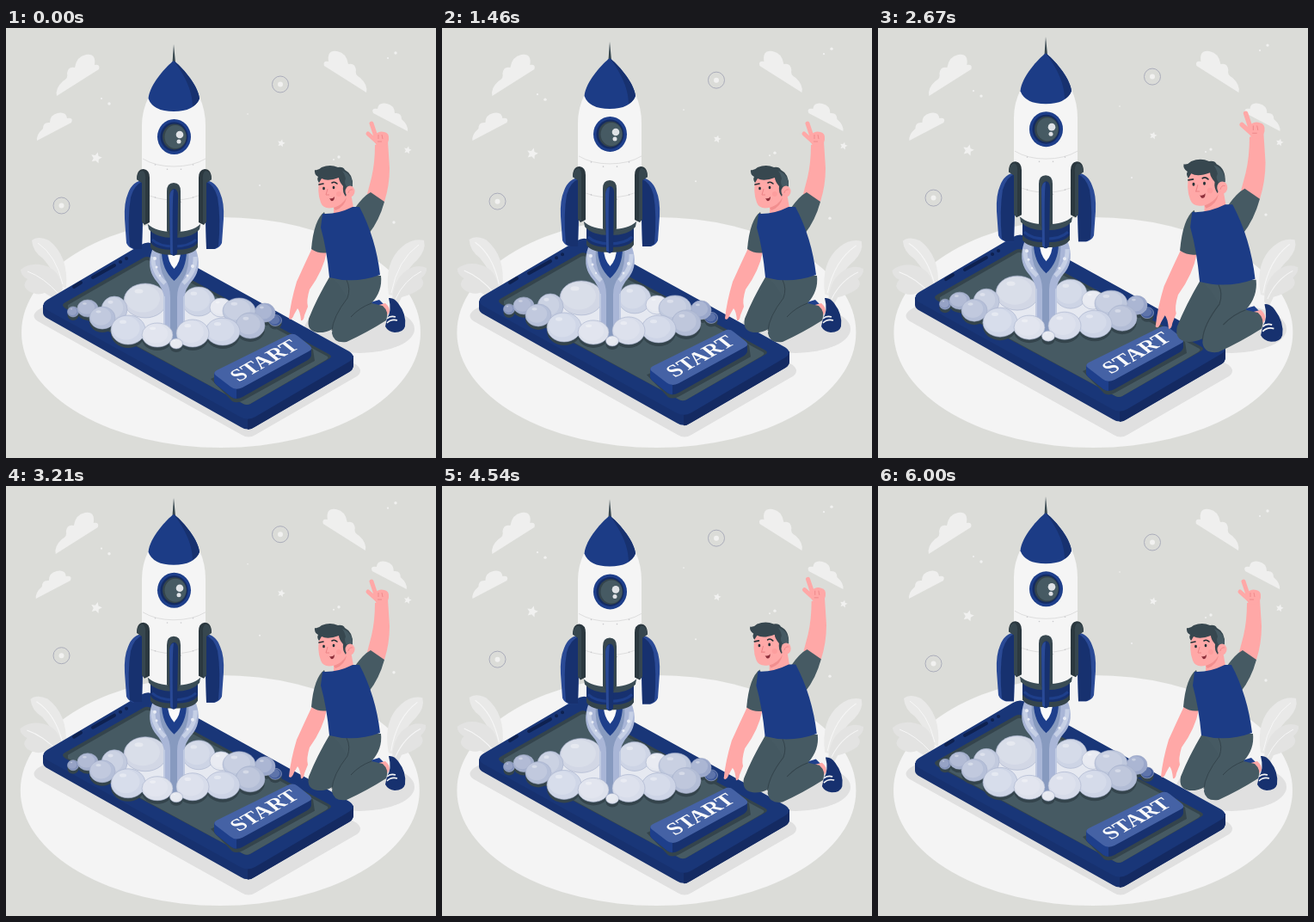
An HTML page for the animation above (6040 ms loop, 500 by 500 pixels).

```html
<!DOCTYPE html>
<html lang="en">
<head>
<meta charset="utf-8">
<title>Rocket launch</title>
<style>
  html, body { margin: 0; width: 100%; height: 100%; overflow: hidden; background: #dbdcd8; }
  svg { display: block; width: 100vw; height: 100vh; }
</style>
</head>
<body>
<svg viewBox="0 0 500 500">
  <defs>
    <path id="cloudBig" d="M59 79 L108 48 Q110 42 103 43 Q105 29 93 31 Q82 33 80 46 Q72 44 71 53 Q73 58 66 62 Q57 70 59 79Z"/>
    <path id="cloudSmall" d="M36 131 L76 110 Q79 104 71 105 Q70 97 60 99 Q51 101 51 110 Q43 109 43 117 Q35 124 36 131Z"/>
    <g id="sideFin">
      <path d="M160 177 Q147 178 142 192 Q137 203 138 222 L140 250 Q142 255 148 257 L158 257Z" fill="#2a4a96"/>
      <path d="M160 178 Q149 182 145 197 Q141 220 144 254 L149 257 L158 257Z" fill="#17316f"/>
      <path d="M152 176 Q152 164 160 164 Q167 165 167 174 V226 L161 229 L158 225 V180Z" fill="#2b383f"/>
      <path d="M152 176 Q153 166 159 166 Q163 168 162 178 V228 L158 225 V180Z" fill="#37474f"/>
    </g>
  </defs>
  <rect width="500" height="500" fill="#dbdcd8"/>

  <g id="backdrop">
    <ellipse cx="250" cy="354" rx="232" ry="134" fill="#f4f4f4"/>
    <g fill="#efefee">
      <use href="#cloudBig"/><use href="#cloudSmall"/>
      <use href="#cloudBig" transform="translate(478 -4) scale(-1 1)"/>
      <use href="#cloudSmall" transform="translate(503 -11) scale(-1 1)"/>
    </g>
  </g>

  <g id="leftPlant">
    <path d="M70 302 Q73 265 50 247 Q37 241 30 247 Q31 260 43 268 Q54 281 65 301Z" fill="#e9e9e8"/>
    <path d="M66 303 Q62 280 44 276 Q28 272 17 281 Q17 288 25 292 Q18 299 25 305 Q36 312 45 308 L58 316Z" fill="#e3e3e2"/>
    <path d="M66 298 Q58 264 37 250 M61 309 Q44 290 25 283" fill="none" stroke="#f7f7f7"/>
  </g>
  <g id="rightPlant">
    <path d="M445 310 Q439 272 461 254 Q473 244 486 247 Q489 258 478 270 Q462 284 452 312Z" fill="#e9e9e8"/>
    <path d="M449 318 Q450 292 467 281 Q479 274 489 279 Q490 285 483 291 Q488 297 482 303 Q472 310 460 313 L454 325Z" fill="#e3e3e2"/>
    <path d="M448 308 Q455 270 480 252 M453 315 Q463 293 483 283" fill="none" stroke="#f7f7f7"/>
  </g>

  <g id="sky"></g>

  <path d="M37 328 L158 258 Q165 255 172 258 L408 392 Q416 399 408 405 L290 473 Q282 478 274 473 L37 341 Q28 335 37 328Z" fill="#e0e0e0"/>
  <ellipse cx="411" cy="350" rx="64" ry="28" fill="#e0e0e0"/>

  <g id="phone">
    <path d="M43 322 V331 Q43 335 49 338 L273 464 Q281 469 289 464 L399 400 Q404 397 404 392 V381Z" fill="#17316f"/>
    <path d="M281 455 V467 Q285 467 289 464 L399 400 Q404 397 404 392 V381Z" fill="#142a62"/>
    <path d="M48 316 L157 252 Q165 247 174 252 L399 376 Q408 382 399 388 L290 452 Q281 457 272 452 L48 328 Q39 322 48 316Z" fill="#193678"/>
    <path d="M69 319 L160 267 Q164 265 168 267 L375 379 Q381 382 375 385 L284 437 Q280 439 276 437 L69 326 Q63 322 69 319Z" fill="#34444c"/>
    <path d="M72 322 L161 271 Q164 269 168 271 L372 381 Q377 383 372 386 L284 437 Q280 439 276 437 L72 326Z" fill="#465a63"/>
    <path d="M79 301 L87 296 M101 290 L126 276 M133 272 h.1 M140 268 h.1" stroke="#0e2150" stroke-width="4" stroke-linecap="round"/>
    <path d="M238 408 L263 434 Q269 437 276 433 L359 387 L357 374 L338 361Z" fill="#34444c"/>
    <path d="M242 401 V410 Q242 413 246 416 L262 429 Q268 433 275 429 L351 386 Q355 383 355 380 V372Z" fill="#17316f"/>
    <path d="M242 401 V410 Q242 413 246 416 L262 429 Q265 431 268 431 V420Z" fill="#1e3f8b"/>
    <path d="M245 398 L328 357 Q334 354 339 358 L353 369 Q358 373 352 376 L275 418 Q267 422 261 417 L244 404 Q240 401 245 398Z" fill="#4562a5"/>
    <text transform="matrix(.87 -.49 .75 .6 306.500 391.500)" text-anchor="middle" font-family="'Liberation Serif', serif" font-weight="bold" font-size="25.5" fill="#fafafa">START</text>
  </g>

  <g id="rocket">
    <g id="smokeShade" fill="#34444c"></g>
    <ellipse cx="197" cy="340" rx="72" ry="25" fill="#e6e9f1"/>
    <g id="smokeBack"></g>
    <path d="M170 258 Q163 278 173 292 Q184 304 184 316 V364 H207 V316 Q207 304 218 292 Q228 278 221 258Z" fill="#a9b6d7"/>
    <path d="M179 258 Q177 279 185 292 Q191 301 191 313 V364 H199 V313 Q199 301 206 292 Q214 279 212 258Z" fill="#879abf"/>
    <path d="M171 266 Q170 283 185 297 M220 266 Q221 283 206 297" fill="none" stroke="#c6d0e6" stroke-width="5"/>
    <path d="M184 312 V364 M207 312 V364" stroke="#c0cae2" stroke-width="2"/>
    <g fill="#e9edf6">
      <circle cx="173" cy="268" r="2"/><circle cx="175" cy="278" r="1.5"/><circle cx="217" cy="277" r="2"/><circle cx="211" cy="288" r="1.5"/><circle cx="179" cy="288" r="1.2"/>
    </g>
    <path d="M181 259 H210 Q210 281 195.500 294 Q181 281 181 259Z" fill="#1e3f8b"/>
    <path d="M188 259 H203 Q203 272 195.500 280 Q188 272 188 259Z" fill="#fafafa"/>
    <g id="smokeFront"></g>

    <path d="M168 235 H223 V255 Q218 264 195.500 264 Q173 264 168 255Z" fill="#34444c"/>
    <path d="M168 235 H223 V249 Q218 258 195.500 258 Q173 258 168 249Z" fill="#17316f"/>
    <path d="M170 246 Q178 254 195 254 Q213 254 221 246" fill="none" stroke="#1e3f8b" stroke-width="3"/>
    <path d="M164 223 H227 L225 234 Q217 244 195.500 244 Q174 244 166 234Z" fill="#3b4d56"/>
    <path d="M166 80 Q158 96 158 113 V175 Q159 210 165 228 Q174 237 195.500 237 Q217 237 226 228 Q232 210 232 175 V113 Q232 96 225 80Z" fill="#f5f5f5"/>
    <path d="M159 152 Q174 161 195 161 Q217 161 232 152 M159 191 Q174 200 195 200 Q217 200 231 191" fill="none" stroke="#dedede"/>
    <g id="rivets" fill="#c9c9cc"></g>
    <path d="M195 19 L197 40 H193.500Z" fill="#37474f"/>
    <path d="M195 38 C203 44 223 65 225 82 Q219 97 195 97 Q171 97 165.500 82 C167 65 187 44 195 38Z" fill="#1c3c86"/>
    <path d="M195 38 C203 44 223 65 225 82 Q223 88 217 91 C217 72 206 52 195 38Z" fill="#17316f"/>
    <ellipse cx="195.500" cy="126.500" rx="19.500" ry="20.500" fill="#1e3f8b"/>
    <ellipse cx="195.500" cy="126.500" rx="16" ry="17" fill="#142b62"/>
    <ellipse cx="196" cy="126.500" rx="14" ry="15" fill="#34444c"/>
    <ellipse cx="197" cy="126.500" rx="12.500" ry="13.500" fill="#465a63"/>
    <circle cx="202" cy="124" r="4.300" fill="#dfe2e6"/><circle cx="201" cy="132" r="2.500" fill="#dfe2e6"/>
    <use href="#sideFin"/><use href="#sideFin" transform="translate(391 0) scale(-1 1)"/>
    <path d="M187 190 Q187 180 195 180 Q203 180 203 190 V236 L199 243 H192 L187 236Z" fill="#37474f"/>
    <path d="M190 196 Q191 187 196 187 Q201 188 200 200 L199 262 Q195 268 191 262Z" fill="#17316f"/>
    <path d="M190 196 Q191 188 195 188 Q193 200 194 264 L191 262Z" fill="#2a4a96"/>
  </g>

  <g id="person">
    <path d="M424 319 L434 316 L441 323 L439 330 L428 326Z" fill="#1e3f8b"/>
    <path d="M430 323 L441 320 Q446 324 446 330 L441 337Z" fill="#ffa8a7"/>
    <path d="M445 314 Q451 313 456 320 Q466 333 464 347 Q462 354 452 354 Q444 353 441 347 L443 338 Q449 329 445 314Z" fill="#17316f"/>
    <path d="M443 338 Q447 334 453 336 M443 343 Q448 338 455 340" fill="none" stroke="#f5f5f5" stroke-width="1.600"/>
    <path d="M377 288 Q361 315 352 338 Q349 352 362 354 Q380 355 386 342 L414 300Z" fill="#445861"/>
    <path d="M377 288 L436 288 Q438 306 425 320 L438 323 Q446 330 442 340 Q420 354 396 365 Q381 367 379 355 Q380 336 397 314 L388 300Z" fill="#465a63"/>
    <path d="M425 320 Q411 325 401 336 M379 352 Q380 336 397 314 Q401 303 396 293" fill="none" stroke="#34444c"/>

    <path d="M429 136 Q429 157 425 174 L420 193 L440 202 Q446 183 446 163 Q445 147 444 132Z" fill="#ffa8a7"/>
    <path d="M425 111 L430 126 M421 123 L431 132" stroke="#ffa8a7" stroke-width="5" stroke-linecap="round"/>
    <path d="M429 124 Q434 119 440 121 Q446 122 445 130 Q444 137 436 138 Q429 137 428 130Z" fill="#ffa8a7"/>
    <path d="M433 124 V129 M437 124 L438 129 M432 132 L437 132" fill="none" stroke="#eb8386" stroke-width=".8"/>
    <path d="M406 209 Q416 195 424 191 L440 202 Q434 224 422 239 Q414 233 408 221Z" fill="#465a63"/>

    <path d="M356 256 Q347 275 338 295 Q331 318 329 338 Q332 341 335 333 L339 326 Q342 329 343 340 Q346 341 347 334 L351 324 Q349 317 353 304 Q369 282 373 260Z" fill="#ffa8a7"/>
    <path d="M370 214 Q358 223 355 257 Q364 263 374 261 L377 232Z" fill="#445861"/>
    <path d="M381 205 L401 192 L404 209 Q393 218 381 216Z" fill="#ffa8a7"/>
    <path d="M368 216 Q385 217 403 208 L411 208 Q430 244 435 287 Q405 298 376 290 Q373 257 366 232Z" fill="#1c3c86"/>

    <path d="M365 174 Q361 190 366 203 Q369 211 380 209 Q391 206 397 196 L399 183 L395 172 Q380 166 365 174Z" fill="#ffa8a7"/>
    <path d="M381 209 Q391 206 396 197 Q394 208 383 212Z" fill="#f28f8f"/>
    <path d="M364 180 Q361 176 363 173 Q358 170 359 165 Q363 166 367 162 Q377 158 386 162 Q392 161 394 165 Q404 170 403 184 L398 187 L395 196 Q391 191 392 184 Q387 178 387 174 Q374 179 367 175Z" fill="#37474f"/>
    <path d="M391 166 Q403 170 403 184 L398 187 Q392 181 395 175 Q394 170 391 166Z" fill="#465a63"/>
    <ellipse cx="400" cy="190" rx="5.500" ry="6.500" fill="#ffa8a7"/>
    <path d="M398 192 Q399 187 403 188" fill="none" stroke="#eb8386" stroke-width=".8"/>
    <g fill="none" stroke="#263238" stroke-linecap="round">
      <path d="M364 182 L369 181 M379 180 Q382 178 385 181" stroke-width="1.600"/>
      <path d="M369.500 186 v1 M381 185 v1" stroke-width="2.600"/>
    </g>
    <path d="M374 187 L372 194 L376 194" fill="none" stroke="#eb8386"/>
    <path d="M376 198 Q380 199 382 196 Q382 202 378 201Z" fill="#8c2f3b"/>
    <circle cx="387" cy="193" r="3" fill="#f78f92" opacity=".4"/>
  </g>
</svg>
<script>
const LOOP = 6040;
const byId = id => document.getElementById(id);
const fill = (id, markup) => { byId(id).innerHTML = markup; };
const dot = (x, y, r) => `<circle cx="${x}" cy="${y}" r="${r}"/>`;

function star(cx, cy, r) {
  const points = Array.from({ length: 10 }, (_, i) => {
    const a = -Math.PI / 2 + 0.25 + i * Math.PI / 5, d = i % 2 ? r * 0.48 : r;
    return `${cx + d * Math.cos(a)},${cy + d * Math.sin(a)}`;
  });
  return `<polygon points="${points.join(' ')}"/>`;
}
const ring = (x, y) =>
  `<circle cx="${x}" cy="${y}" r="9.5" fill="none" stroke="#a5a7b7" stroke-width=".9"/>` + dot(x, y, 3);

fill('sky', '<g fill="#f1f1f0">' + ring(319, 65.5) + ring(64.5, 206.5) +
  star(105, 151, 6.8) + star(320, 134, 4.6) + star(467, 142, 4.6) +
  [[120, 88, 1.7], [111, 82, 1.1], [453, 29, 1.7], [444, 35, 1.1], [387, 150, 1.7], [381, 153, 1],
   [281, 100, .8], [295, 183, 1], [451, 226, 1.7]].map(p => dot(...p)).join('') + '</g>');

// Puffs: x, y, rx, ry, colour
const backPuffs = [
  [78, 330, 6.5, 6, '#8291ba'], [95, 326, 12, 10, '#a4afcd'], [162, 317, 25, 20, '#d2d7e5'],
  [126, 327, 15, 15, '#c2cade'], [112, 337, 15, 13, '#b5bfd8'],
  [224, 318, 19, 17, '#cdd4e5'], [250, 325, 13, 11, '#e5e8f0'],
  [313, 340, 7.5, 6.5, '#405a9a'], [301, 331, 12, 11, '#9ba8cb'], [271, 329, 19, 15, '#bfc8dd']
];
const frontPuffs = [
  [142, 351, 20, 17, '#cfd6e7'], [284, 346, 17, 15, '#b3bdd6'], [252, 353, 20, 16, '#cdd4e6'],
  [176, 357, 18, 14, '#dde1ec'], [217, 355, 19, 16, '#d7dcea'], [198, 367, 7.5, 6, '#e3e6ef']
];
const puff = ([x, y, rx, ry, color]) => `
  <ellipse cx="${x}" cy="${y}" rx="${rx}" ry="${ry}" fill="${color}" stroke="#a7b1cc" stroke-width=".6"/>
  <ellipse cx="${x - rx * .12}" cy="${y - ry * .12}" rx="${rx * .8}" ry="${ry * .8}" fill="#fff" opacity=".16"/>
  <ellipse cx="${x - rx * .3}" cy="${y - ry * .55}" rx="${rx * .2}" ry="${ry * .13}" fill="#fff" opacity=".35"/>`;
const shade = ([x, y, rx, ry]) => `<ellipse cx="${x}" cy="${y + 4}" rx="${rx}" ry="${ry}"/>`;
fill('smokeBack', backPuffs.map(puff).join(''));
fill('smokeFront', frontPuffs.map(puff).join(''));
fill('smokeShade', [...backPuffs, ...frontPuffs].map(shade).join(''));

fill('rivets', [165, 203].map(y =>
  [-22, -8, 8, 22].map(x => dot(195.5 + x, y - x * x / 80, .8)).join('')).join(''));

// Linear keyframes given as [time, value] pairs
function track(keys, t) {
  const i = keys.findIndex(k => k[0] > t);
  if (i < 0) return keys[keys.length - 1][1];
  if (i === 0) return keys[0][1];
  const [t0, v0] = keys[i - 1], [t1, v1] = keys[i];
  return v0 + (v1 - v0) * (t - t0) / (t1 - t0);
}
const lift = u => -10 * (1 - Math.abs(1 - 2 * (u % 1)));
const shake = [0, -1, 2, -4, 4, -4, 4, -4, 2, -1, 0].map((x, i) => [i * 600, x]);
const beat = [[2300, 1], [2700, 1.1], [2900, 1], [4460, 1], [4860, 1.1], [5060, 1]];

const move = (id, transform) => byId(id).setAttribute('transform', transform);

function draw(t) {
  const slow = lift(Math.min(t, 6000) / 6000);
  const fast = t > 1000 ? lift((t - 1000) / 3000) : 0;
  const sway = t > 800 && t < 5300 ? 1.5 * Math.sin((t - 800) / 3000 * 2 * Math.PI) : 0;
  move('phone', `translate(0 ${slow})`);
  move('sky', `translate(0 ${slow})`);
  move('rocket', `translate(0 ${fast})`);
  move('backdrop', `translate(${track(shake, t)} 0)`);
  move('leftPlant', `rotate(${sway} 66 310)`);
  move('rightPlant', `rotate(${sway} 450 318)`);
  move('person', `translate(397 237) scale(${track(beat, t)}) translate(-397 -237)`);
}

const start = performance.now();
function tick() {
  draw((performance.now() - start) % LOOP);
  requestAnimationFrame(tick);
}
tick();
</script>
</body>
</html>
```
